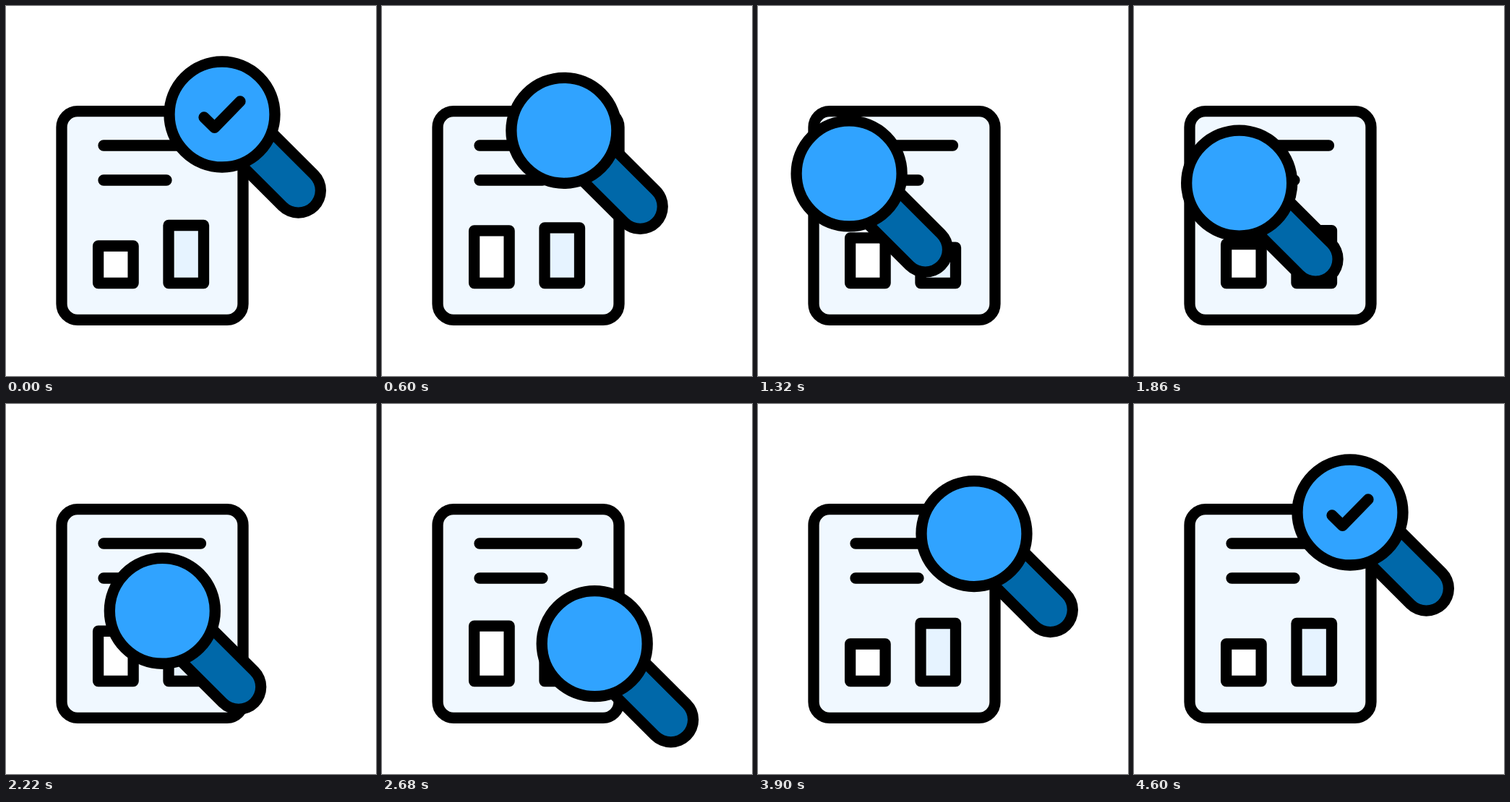
An HTML page for the animation above (4.82 s loop, 512 by 512 pixels).

```html
<!DOCTYPE html>
<html>
<head>
<meta charset="utf-8">
<style>
  html, body { margin: 0; width: 100%; height: 100%; overflow: hidden; background: #fff; }
  svg { display: block; width: 100vw; height: 100vh; }
</style>
</head>
<body>
<svg viewBox="0 0 512 512" fill="none" stroke="#000" stroke-width="15.3" stroke-linecap="round" stroke-linejoin="round">
  <rect x="77" y="145.7" width="251" height="288.6" rx="22" fill="#f0f8ff"/>
  <path d="M135 193H269.5M135 241H222"/>
  <path id="shortBar" fill="#fff"/>
  <path id="tallBar" fill="#e6f3ff"/>
  <g id="glass">
    <path d="M0 0L105.5 105.2" stroke-width="77"/>
    <path d="M0 0L105.5 105.2" stroke="#0068a9" stroke-width="46.6"/>
    <circle r="73" fill="#30a3ff"/>
    <path id="check" d="M-25 4L-10.5 18.3L25 -18" pathLength="1"/>
  </g>
</svg>
<script>
  const LOOP = 4820, BEAT = 850, BASE = 383.5;
  const [shortBar, tallBar, glass, check] =
    ['shortBar', 'tallBar', 'glass', 'check'].map(id => document.getElementById(id));

  const ease = (t, start, length) => {
    const p = Math.min(1, Math.max(0, (t - start) / length));
    return p * p * (3 - 2 * p);
  };

  // Two there-and-back swings, 0 to 1 to 0
  const swing = (t, start) => [0, 1, 2, 3].reduce(
    (sum, i) => sum + (i % 2 ? -1 : 1) * ease(t, start + i * BEAT, BEAT), 0);

  const setBar = (bar, x, top) => bar.setAttribute('d', `M${x} ${BASE}V${top}h48.5V${BASE}Z`);

  function draw(t) {
    setBar(shortBar, 127.6, 332 - 26.6 * swing(t, 0));
    setBar(tallBar, 225, 303.5 + 31 * swing(t, 425));

    const left = ease(t, 193, 1195), right = ease(t, 1600, 1200), up = ease(t, 3020, 1180);
    const x = 299 + 174.5 * (right - left);
    const y = 150 + 82.7 * left + 101.8 * right - 184.5 * up;
    glass.setAttribute('transform', `translate(${x} ${y})`);

    const drawn = 1 - ease(t, 0, 200) + ease(t, 4200, 400);
    check.setAttribute('stroke-dasharray', `${drawn} 2`);
    check.setAttribute('visibility', drawn > 0.001 ? 'visible' : 'hidden');
  }

  const start = performance.now();
  function tick() {
    draw((performance.now() - start) % LOOP);
    requestAnimationFrame(tick);
  }
  tick();
</script>
</body>
</html>
```
